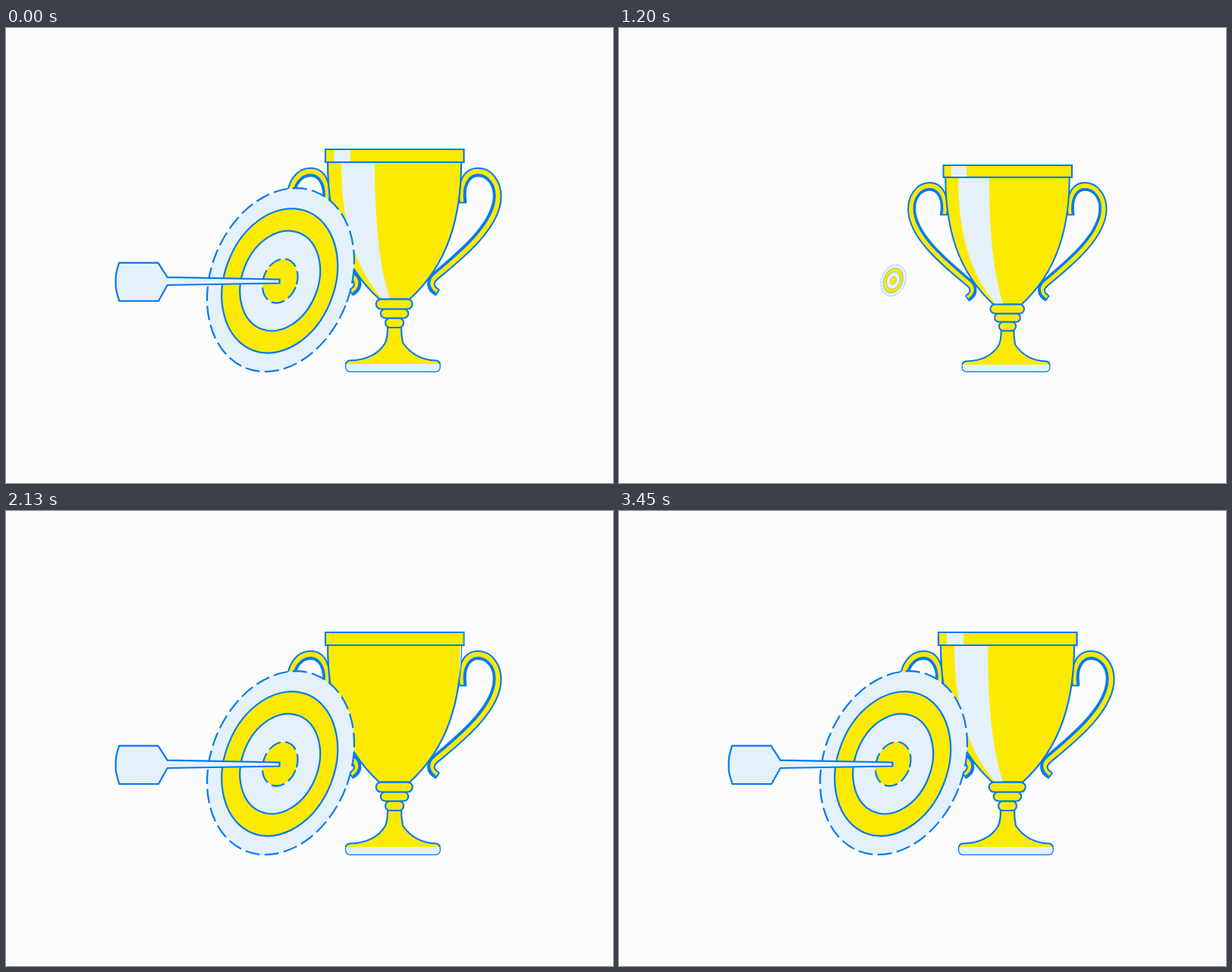
Animation, 800 px wide and 600 px high, one loop 4.14 s. Source, as an HTML page with a canvas:

```html
<!DOCTYPE html>
<html lang="en">
<head>
<meta charset="utf-8">
<title>Trophy and target</title>
<style>
html, body { margin: 0; width: 100%; height: 100%; overflow: hidden; background: #fcfcfc; }
canvas { display: block; width: 800px; height: 600px; }
</style>
</head>
<body>
<canvas id="stage" width="800" height="600"></canvas>
<script>
const ctx = document.getElementById('stage').getContext('2d');
const BLUE = '#007af5', YELLOW = '#fcea00', LIGHT = '#e4f1fa', PAPER = '#fcfcfc';
const LOOP = 4140, STEP = 30, LINE = 2.2;

// Eased keyframes: [time, value] pairs, held at both ends.
function track(t, keys) {
  if (t <= keys[0][0]) return keys[0][1];
  for (let i = 1; i < keys.length; i++) {
    const [t0, a] = keys[i - 1], [t1, b] = keys[i];
    if (t < t1) {
      const u = (t - t0) / (t1 - t0);
      return a + (b - a) * u * u * (3 - 2 * u);
    }
  }
  return keys[keys.length - 1][1];
}

const popOut = [[0, 1], [180, 1.1], [480, 0]];
const popIn = start => [[start, 0], [start + 360, 1.1], [start + 540, 1]];
const popScale = (t, start) => track(t, t < 500 ? popOut : popIn(start));

function paint(path, fill, width = LINE) {
  if (fill) {
    ctx.fillStyle = fill;
    ctx.fill(path);
  }
  ctx.lineWidth = width;
  ctx.strokeStyle = BLUE;
  ctx.stroke(path);
}

function line(path, color, width) {
  ctx.lineWidth = width;
  ctx.strokeStyle = color;
  ctx.stroke(path);
}

function scaled(x, y, s, draw) {
  if (s < 0.004) return;
  ctx.save();
  ctx.translate(x, y);
  ctx.scale(s, s);
  ctx.translate(-x, -y);
  draw();
  ctx.restore();
}

// ---- trophy ----
const handle = new Path2D('M602 230C598 205 607 189 622 189C638 189 648.3 205 648.3 222C648.3 262 596 303 567 327C558 334 558 343 568.5 348.5');
const shade = new Path2D('M605.2 230C602 208 610 194.3 622 194.3C635 194.3 643.6 207 643.6 221C643.6 260 590 301 562 325.5C554.5 333 556 344 566 350.5');
const caps = new Path2D('M597 230.3H607.2M571.2 345L566.2 352.3');
const body = new Path2D('M424 177H600C600 250 582 312 532 357.5H492C442 312 424 250 424 177Z');
const rim = new Path2D('M421 160H603.5V177H421Z');
const foot = new Path2D('M503 395C503 402 502 410 500 415C490 432 471 438 453 438.5C449 439 447.5 442 447.5 446C447.5 451 450 453.3 454 453.3H566C570 453.3 572.3 451 572.3 446C572.3 442 570.5 439 567 438.5C550 438 534 431 523 415C522 410 521 402 521 395Z');

function pill(cx, y, w, h) {
  const p = new Path2D();
  p.roundRect(cx - w / 2, y, w, h, h / 2);
  paint(p, YELLOW);
}

function drawHandle() {
  line(handle, BLUE, 10.6);
  line(handle, YELLOW, 6.4);
  line(shade, BLUE, 3.8);
  line(caps, BLUE, 2);
}

// A strip between two meridians of the cup, sliding and turning with p.
function drawShine(p) {
  const turn = Math.min(1, Math.max(0, p));
  const mid = 512 + 18 * turn + 114 * (p - turn);
  const a = -70 + 96 * turn, b = a + 44;
  const strip = new Path2D();
  strip.moveTo(mid + a, 178);
  strip.bezierCurveTo(mid + a, 250, mid + a * 0.795, 312, mid + a * 0.227, 357.5);
  strip.lineTo(mid + b * 0.227, 357.5);
  strip.bezierCurveTo(mid + b * 0.795, 312, mid + b, 250, mid + b, 178);
  ctx.save();
  ctx.clip(body);
  ctx.fillStyle = LIGHT;
  ctx.fill(strip);
  ctx.restore();
}

function drawTrophy(shine) {
  drawHandle();
  ctx.save();
  ctx.translate(1023.5, 0);
  ctx.scale(-1, 1);
  drawHandle();
  ctx.restore();

  paint(body, YELLOW);
  drawShine(shine);
  paint(rim, YELLOW);
  ctx.save();
  ctx.clip(rim);
  ctx.fillStyle = LIGHT;
  ctx.fillRect(432 + 125 * shine, 161.1, 22, 14.8);
  ctx.restore();

  ctx.fillStyle = YELLOW;
  ctx.fill(foot);
  ctx.save();
  ctx.clip(foot);
  ctx.fillStyle = LIGHT;
  ctx.fillRect(440, 443, 140, 12);
  ctx.restore();
  ctx.save();
  ctx.beginPath();
  ctx.rect(440, 390, 140, 53);
  ctx.clip();
  paint(foot);
  ctx.restore();
  ctx.save();
  ctx.beginPath();
  ctx.rect(440, 443, 140, 14);
  ctx.clip();
  paint(foot, null, 1.3);
  ctx.restore();

  pill(512, 382.5, 24, 12.5);
  pill(512, 370.5, 36.5, 12);
  pill(511.7, 357.7, 48, 12.8);
}

// ---- target and dart ----
function ring(cx, cy, k, fill, dash) {
  const p = new Path2D();
  p.ellipse(cx, cy, 91.9 * k, 124.9 * k, 21.5 * Math.PI / 180, 0, Math.PI * 2);
  ctx.setLineDash(dash || []);
  paint(p, fill);
  ctx.setLineDash([]);
}

function drawTarget() {
  ring(362, 332.2, 1, LIGHT, [19, 6.4]);
  ring(360.7, 333.3, 0.787, YELLOW);
  ring(361.2, 333.4, 0.545, LIGHT);
  ring(361.2, 333.6, 0.24, YELLOW, [17.5, 6.2]);
}

const dart = new Path2D('M149 309.7H200.5L212.7 328.6L360.5 331.5V336.5L212.7 339L201 360H149.3C146.5 351 144.6 344 144.6 340V330C144.8 325 147 316 149 309.7Z');

// ---- sparkle ----
function drawSparkle(t) {
  const s = track(t, [[2580, 0], [2940, 1.1], [3090, 0.95], [3420, 0]]);
  scaled(597, 162, s, () => {
    const star = new Path2D();
    const spin = track(t, [[2580, -0.6], [3420, 0.6]]);
    for (let i = 0; i < 10; i++) {
      const r = i % 2 ? 11 : 25, a = spin - Math.PI / 2 + i * Math.PI / 5;
      star.lineTo(597 + r * Math.cos(a), 162 + r * Math.sin(a));
    }
    star.closePath();
    paint(star, YELLOW, 2);
  });
}

function shineAt(t) {
  if (t < 2160) return track(t, [[1560, 0], [2130, 1.37], [2160, 1.45]]);
  if (t < 2940) return track(t, [[2160, -0.56], [2917, 1.4]]);
  return track(t, [[2940, -0.56], [3450, 0]]);
}

function render(t) {
  ctx.fillStyle = PAPER;
  ctx.fillRect(0, 0, 800, 600);
  ctx.lineJoin = 'miter';
  scaled(512, 453.5, popScale(t, 930), () => drawTrophy(shineAt(t)));
  scaled(361.5, 333, popScale(t, 1110), drawTarget);
  scaled(361, 334, t < 500 ? track(t, popOut) : 1, () => {
    if (t >= 500) ctx.translate(track(t, [[1470, -370], [1830, 0]]), 0);
    paint(dart, LIGHT);
  });
  drawSparkle(t);
}

const begin = performance.now();
function tick() {
  const t = (performance.now() - begin) % LOOP;
  render(Math.floor(t / STEP) * STEP);
  requestAnimationFrame(tick);
}
tick();
</script>
</body>
</html>
```
